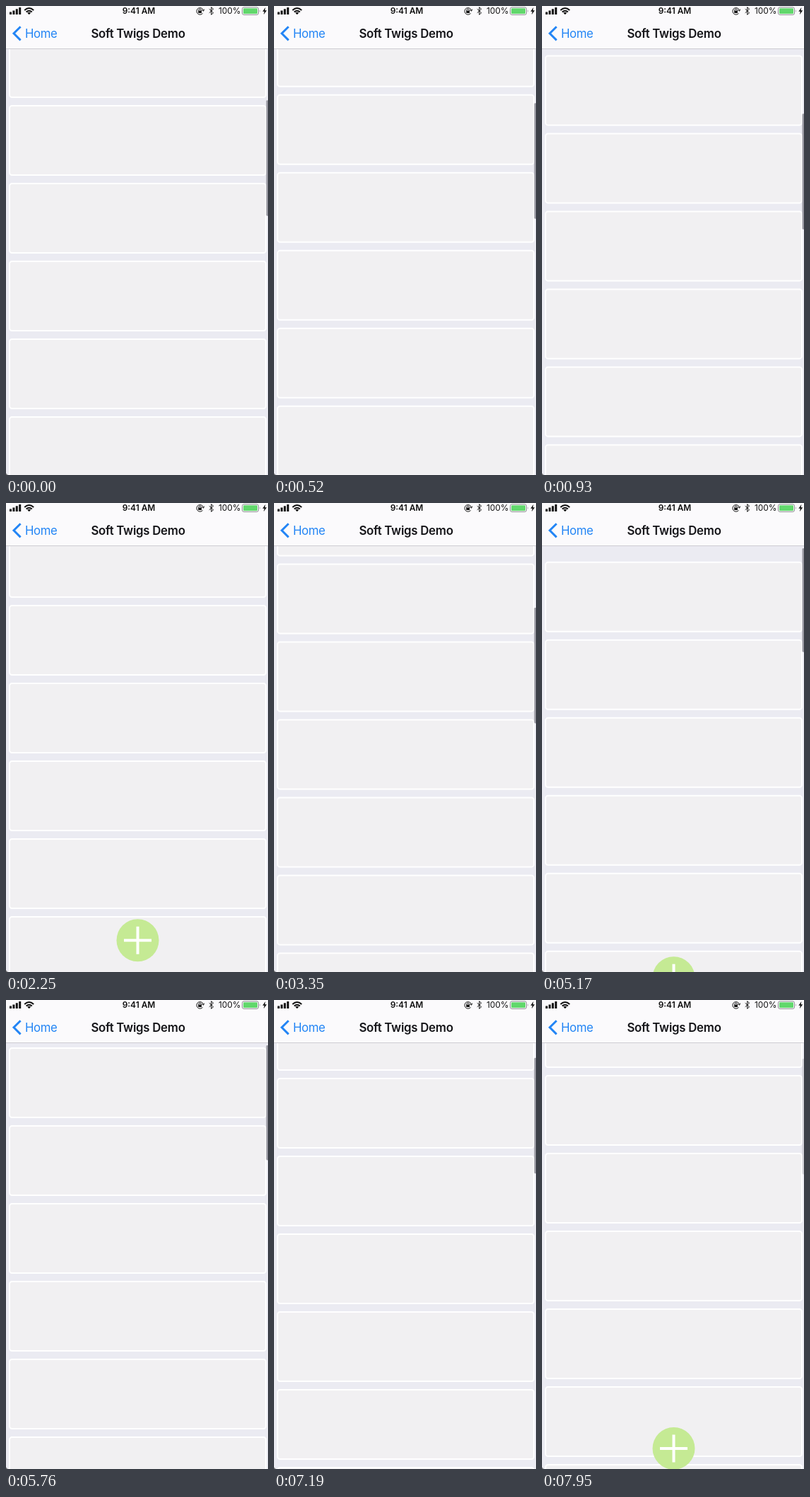
Write an HTML page that moves like this. It is 371 px wide and 663 px high and loops after 8000 ms.

```html
<!DOCTYPE html>
<html lang="en">
<head>
<meta charset="utf-8">
<title>Scrolling list</title>
<style>
  html, body { margin: 0; width: 100%; height: 100%; overflow: hidden; background: #ebebf2; }
  svg { display: block; width: 371px; height: 663px; font-family: Inter, Roboto, sans-serif; }
  .card { fill: #f1f0f2; stroke: #fff; stroke-width: 2; }
  .line { fill: none; stroke: #111; stroke-width: 1; }
</style>
</head>
<body>
<svg viewBox="0 0 371 663">
  <rect width="371" height="663" fill="#ebebf2"/>
  <g id="list"></g>
  <rect id="bar" x="368.5" width="3" rx="1.4" fill="#9797a0"/>
  <g id="button">
    <circle r="30" fill="#c5ea94"/>
    <path d="M-19.5 0H19.5M0-19.5V19.5" stroke="#fff" stroke-width="4"/>
  </g>
  <path d="M0 660.5V663H2.5Z" fill="#777"/>

  <rect width="371" height="60" fill="#fbfafc"/>
  <rect y="60" width="371" height="1" fill="#cdccd2"/>

  <!-- status bar -->
  <path d="M5 8.5h3v3.5h-3zM9.4 6.5h3v5.5h-3zM13.8 4.3h3v7.7h-3zM18.2 2h3v10h-3z" fill="#111"/>
  <g fill="none" stroke="#111" stroke-width="2">
    <path d="M26.2 5.9Q32.7 .2 39.2 5.9"/>
    <path d="M28.6 8.5Q32.7 4.9 36.8 8.5"/>
  </g>
  <path d="M30.2 9.6Q32.7 7.7 35.2 9.6L32.7 12.3Z" fill="#111"/>
  <text x="188" y="11.2" text-anchor="middle" font-size="11.9" font-weight="600" fill="#111">9:41 AM</text>
  <path class="line" d="M278.6 10.2A4.8 4.8 0 1 1 279.4 6.2M277.4 5.6l2.2 1.6 1.1-2.6M273 7V5.7a1.6 1.6 0 0 1 3.2 0V7"/>
  <rect x="272.2" y="6.6" width="4.8" height="3.4" fill="#111"/>
  <path class="line" d="M287.7 4.2L293.6 9.7 290.7 12.3V1.7L293.6 4.3 287.7 9.8"/>
  <text x="301" y="11.3" font-size="11.9" fill="#111">100%</text>
  <rect x="334.5" y="1.8" width="23" height="10.6" rx="2.4" fill="none" stroke="#8b8b90"/>
  <rect x="336" y="3.2" width="20" height="7.8" rx="1.2" fill="#61d86c"/>
  <path d="M359 5.3q1.6 1.8 0 3.6z" fill="#8b8b90"/>
  <path d="M367.4 2L363.3 7.7h2.5L364.8 12.2 369.2 6.2h-2.6z" fill="#111"/>

  <!-- navigation bar -->
  <path d="M20.6 29.2L11 38.8 20.6 48.4" fill="none" stroke="#2385f5" stroke-width="3"/>
  <text x="27" y="45" font-size="16.8" letter-spacing="-.45" fill="#2385f5">Home</text>
  <text x="187" y="45" text-anchor="middle" font-size="16.8" font-weight="600" letter-spacing="-.25" fill="#141418">Soft Twigs Demo</text>
</svg>
<script>
const LOOP = 8000, TOP = 66, PITCH = 110, REST = 595, HIDDEN = 695;
const byId = id => document.getElementById(id);
const list = byId('list'), bar = byId('bar'), button = byId('button');

for (let i = 0; i < 20; i++) {
  const card = document.createElementNS('http://www.w3.org/2000/svg', 'rect');
  const box = { class: 'card', x: 5, y: TOP + 1 + i * PITCH, width: 363, height: 98, rx: 3.5 };
  for (const key in box) card.setAttribute(key, box[key]);
  list.append(card);
}

const linear = p => p;
const easeIn = p => p * p;
const easeOut = p => 1 - (1 - p) ** 3;
const easeInOut = p => p < .5 ? 2 * p * p : 1 - 2 * (1 - p) ** 2;

// Each step: time, value, easing used to arrive there.
const scroll = [
  [0, 256], [120, 256], [870, 309, easeIn], [930, 326.5], [1790, 361.5, easeOut], [1970, 362],
  [3010, 362], [4290, 0, easeInOut],
  [5060, 0], [5380, -70, easeInOut], [5760, -1, easeOut], [5820, 0],
  [6950, 0], [7190, 66, easeOut], [7310, 66], [7370, 68], [7600, 68], [7660, 70], [LOOP, 70]
];
const lift = [
  [0, HIDDEN], [2106, HIDDEN], [2326, REST, easeInOut],
  [2990, REST], [3190, HIDDEN, easeInOut], [4289, HIDDEN], [4509, REST, easeInOut],
  [5040, REST], [5240, HIDDEN, easeInOut], [5840, HIDDEN], [6060, REST, easeInOut],
  [6930, REST], [7130, HIDDEN, easeInOut], [7828, HIDDEN], [8048, REST, easeInOut]
];
const fade = [
  [0, 1], [2130, 1], [2240, 0], [3000, 0], [3060, 1], [4360, 1], [4470, 0],
  [5050, 0], [5110, 1], [5870, 1], [5980, 0], [6940, 0], [7000, 1], [7880, 1], [7990, 0], [LOOP, 0]
];

function at(steps, t) {
  const i = steps.findIndex(step => step[0] > t);
  if (i < 0) return steps[steps.length - 1][1];
  const [t0, from] = steps[i - 1], [t1, to, ease = linear] = steps[i];
  return from + (to - from) * ease((t - t0) / (t1 - t0));
}

function draw(t) {
  const s = at(scroll, t);
  list.setAttribute('transform', `translate(0 ${-s})`);
  bar.setAttribute('y', 64 + Math.max(0, s) / 3.7);
  bar.setAttribute('height', 163.5 + Math.min(0, s));
  bar.setAttribute('opacity', at(fade, t));
  button.setAttribute('transform', `translate(186.5 ${at(lift, t)})`);
}

const start = performance.now();
function tick() {
  draw((performance.now() - start) % LOOP);
  requestAnimationFrame(tick);
}
tick();
</script>
</body>
</html>
```
